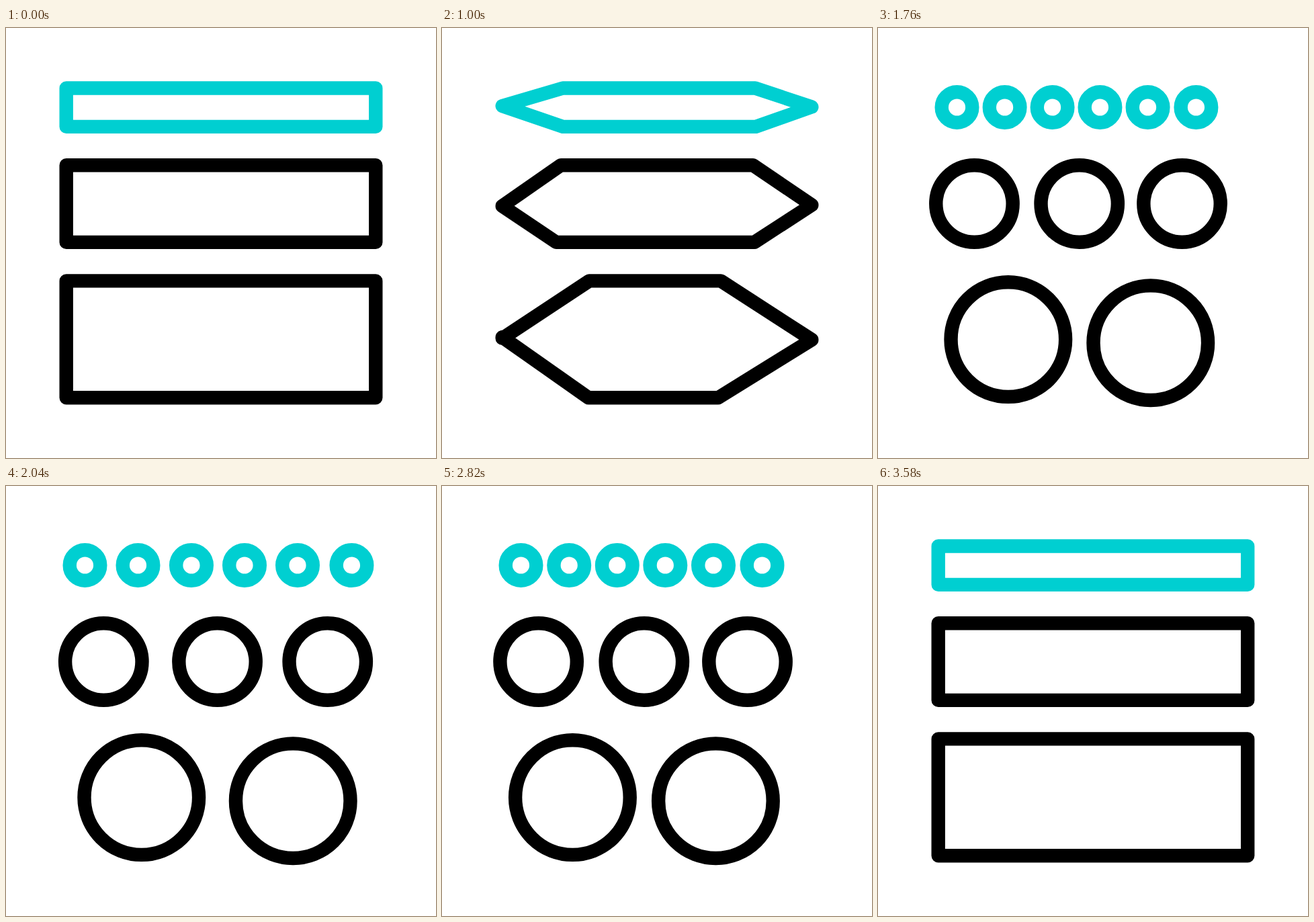
An HTML page for the animation above (3600 ms loop, 640x640 px).

```html
<!DOCTYPE html>
<html lang="en">
<head>
<meta charset="utf-8">
<title>Shapes</title>
<style>
  html, body { margin: 0; width: 100%; height: 100%; overflow: hidden; background: #fff; }
  svg { display: block; width: 100%; height: 100%; }
  path { fill: none; stroke: #000; stroke-width: 20.4; stroke-linejoin: round; }
  #row0 { stroke: #00cfd1; }
</style>
</head>
<body>
<svg viewBox="0 0 640 640">
  <path id="row0"/>
  <path id="row1"/>
  <path id="row2"/>
</svg>
<script>
const LOOP = 3600, STEP = 20;
const LEFT = 89.7, RIGHT = 550.3;

// hex: x of top left, top right, bottom right, bottom left
// sides: y of the left upper, left lower and right tips
// rings: x at rest, x shift per unit of squeeze, y
const rows = [
  { top: 89.5, bottom: 146.9, hex: [180, 466, 467, 180], sides: [116, 116, 117.5], slide: true, r: 22.8,
    rings: [[117.5, 0, 118], [197.8, 8.6, 118], [278.7, 17.9, 118],
            [359.1, 26.8, 118], [439.4, 35.4, 118], [521.3, 44.8, 118]] },
  { top: 204.2, bottom: 318.9, hex: [177, 463, 465, 170], sides: [265, 265, 263.5], r: 57.2,
    rings: [[145.6, 2, 261.5], [317, 16.2, 261.5], [483.1, 28.6, 261.5]] },
  { top: 376.4, bottom: 550.3, hex: [219, 415, 411, 218], sides: [462, 460, 464], r: 85.3,
    rings: [[203.1, 8.7, 463.6], [430.8, 23.4, 468.7]] }
];
const paths = rows.map((_, i) => document.getElementById('row' + i));

const mix = (a, b, p) => a + (b - a) * p;
const square = x => x * x;
const clamp = x => Math.min(1, Math.max(0, x));
const easeInOut = s => s < 0.5 ? 2 * s * s : 1 - 2 * square(1 - s);
const polygon = points => 'M' + points.map(p => p.join(' ')).join('L') + 'Z';

// p = 0 is the rectangle, p = 1 the hexagon
function hexagon({ top, bottom, hex, sides, slide }, p) {
  const [tl, tr, br, bl] = hex, [upper, lower, tip] = sides;
  if (slide) {
    return polygon([
      [mix(LEFT, tl, p), top], [mix(RIGHT, tr, p), top], [RIGHT, tip],
      [mix(RIGHT, br, p), bottom], [mix(LEFT, bl, p), bottom], [LEFT, upper]
    ]);
  }
  return polygon([
    [tl, top], [tr, top], [RIGHT, mix(top, tip, p)], [RIGHT, mix(bottom, tip, p)],
    [br, bottom], [bl, bottom], [LEFT, mix(bottom, lower, p)], [LEFT, mix(top, upper, p)]
  ]);
}

function rect({ top, bottom }, right) {
  return polygon([[LEFT, top], [right, top], [right, bottom], [LEFT, bottom]]);
}

function circles({ r, rings }, squeeze) {
  return rings.map(([x, shift, y]) => {
    const arc = d => `a${r} ${r} 0 1 1 ${d} 0`;
    return `M${x - shift * squeeze - r} ${y}${arc(2 * r)}${arc(-2 * r)}Z`;
  }).join('');
}

function shape(row, t) {
  if (t < 980) return hexagon(row, easeInOut(clamp((t - 65) / 500)));
  if (t < 1590) return hexagon(row, 1 - clamp(square((t - 980) / 600)));
  if (t < 2210) return circles(row, 0.1525 * square((2210 - t) / 170));
  if (t < 3050) return circles(row, square(Math.max(0, t - 2490) / 330));
  return rect(row, RIGHT - 210.5 * square((3590 - t) / 510));
}

function draw(now) {
  const t = Math.floor((now % LOOP) / STEP) * STEP;
  rows.forEach((row, i) => paths[i].setAttribute('d', shape(row, t)));
}

const start = performance.now();
function tick() {
  draw(performance.now() - start);
  requestAnimationFrame(tick);
}
tick();
</script>
</body>
</html>
```
